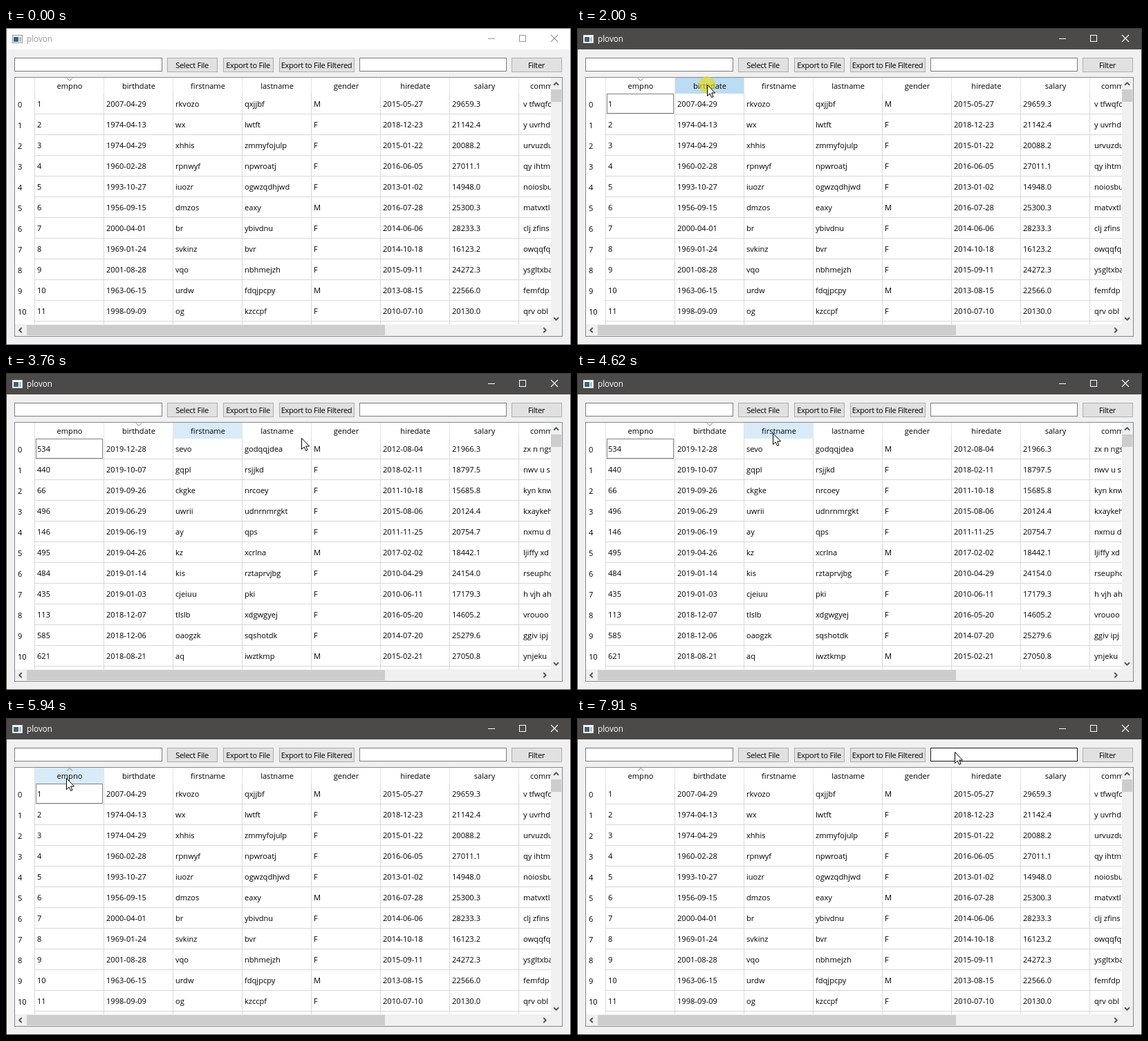
Recreate the animation shown at these times as an HTML page with a canvas. Size 817x459 px, loop 8 s.

```html
<!DOCTYPE html>
<html lang="en">
<head>
<meta charset="utf-8">
<title>Sortable table</title>
<style>
  html, body { margin: 0; width: 100%; height: 100%; overflow: hidden; background: #f0f0f0; }
  canvas { display: block; }
</style>
</head>
<body>
<canvas id="stage" width="817" height="459"></canvas>
<script>
const ctx = document.getElementById('stage').getContext('2d', { alpha: false });
const LOOP = 8000;
const HEADERS = ['empno', 'birthdate', 'firstname', 'lastname', 'gender', 'hiredate', 'salary', 'comment'];

// Seven single-word fields per line; the rest of the line is the comment.
const parse = text => text.trim().split('\n').map(line => {
  const words = line.trim().split(' ');
  return [...words.slice(0, 7), words.slice(7).join(' ')];
});

const byNumber = parse(`
1 2007-04-29 rkvozo qxjjbf M 2015-05-27 29659.3 v tfwqfc
2 1974-04-13 wx lwtft F 2018-12-23 21142.4 y uvrhd
3 1974-04-29 xhhis zmmyfojulp F 2015-01-22 20088.2 urvuzdu
4 1960-02-28 rpnwyf npwroatj F 2016-06-05 27011.1 qy ihtm
5 1993-10-27 iuozr ogwzqdhjwd F 2013-01-02 14948.0 noiosbu
6 1956-09-15 dmzos eaxy M 2016-07-28 25300.3 matvxtl
7 2000-04-01 br ybivdnu F 2014-06-06 28233.3 clj zfins
8 1969-01-24 svkinz bvr F 2014-10-18 16123.2 owqqfq
9 2001-08-28 vqo nbhmejzh F 2015-09-11 24272.3 ysgltxba
10 1963-06-15 urdw fdqjpcpy M 2013-08-15 22566.0 femfdp
11 1998-09-09 og kzccpf F 2010-07-10 20130.0 qrv obl`);

const oldestFirst = parse(`
442 1955-04-13 lqcqcs dhzzr F 2019-05-24 15337.5 trtapqjp
497 1955-06-12 jzzo xatep M 2011-05-02 26341.8 d jrhtwt
154 1955-06-16 gxojo ronhlmi M 2012-09-08 25099.3 z oxcj jk
185 1955-06-20 jdsd tqcnvvd F 2010-03-10 10317.3 ixxrmvz
259 1955-06-29 qhf nlpytogav F 2014-11-22 10862.8 t bxrhzk
140 1955-08-01 qpbuk xhywh M 2015-11-05 15096.9 bwhzhy
102 1955-09-02 lsufj rkyhsy M 2019-11-13 26748.7 irrt ams
267 1955-10-31 fqrmu wlqlb F 2010-11-23 14117.4 tqyyznc
583 1955-11-19 wnda xtqjxfpl F 2011-01-23 19784.3 ivmdbnr
297 1956-01-28 jkozs uubutrvxzc F 2016-09-02 12181.5 lpumrtc
403 1956-04-08 lt vpzhsxbss F 2010-12-13 14075.8 gmpjns`);

const youngestFirst = parse(`
534 2019-12-28 sevo godqqjdea M 2012-08-04 21966.3 zx n ngs
440 2019-10-07 gqpl rsjjkd F 2018-02-11 18797.5 nwv u s
66 2019-09-26 ckgke nrcoey F 2011-10-18 15685.8 kyn knw
496 2019-06-29 uwrii udnrnmrgkt F 2015-08-06 20124.4 kxaykeh
146 2019-06-19 ay qps F 2011-11-25 20754.7 nxmu d
495 2019-04-26 kz xcrlna M 2017-02-02 18442.1 ljiffy xd
484 2019-01-14 kis rztaprvjbg F 2010-04-29 24154.0 rseupho
435 2019-01-03 cjeiuu pki F 2010-06-11 17179.3 h vjh ah
113 2018-12-07 tlslb xdgwgyej F 2016-05-20 14605.2 vrouoo
585 2018-12-06 oaogzk sqshotdk F 2014-07-20 25279.6 ggiv ipj
621 2018-08-21 aq iwztkmp M 2015-02-21 27050.8 ynjeku`);

const firstNamesUp = parse(`
97 1992-02-25 aafvrv sq F 2019-01-20 16741.0 v faq pa
214 1960-06-30 aaie qmftppdytx M 2012-05-20 29180.5 dlyelb b
383 1973-02-21 abbcq ov F 2010-07-25 24051.7 vb zdbw
19 1966-03-14 acsazo amwdlsjis M 2011-04-16 22995.0 t epmh
181 1967-10-12 acsdy uisia M 2017-07-30 10876.9 unij elg
163 1998-08-18 acuzmp vlusapni F 2019-07-09 23347.6 nfohgx
433 1970-02-04 acymmt qxxzxsd M 2019-11-14 13202.0 i gj bcg
547 1963-01-26 adoax qhabo F 2011-03-15 15832.5 trennzg
395 1962-05-08 aftmu anzssulu F 2011-02-18 28120.1 auukyc
456 2018-02-23 afw rcgc M 2015-02-02 11947.7 skxihy p
49 1969-07-29 aggp utk M 2019-05-15 14537.9 rfowto j`);

function makeFirstNamesDown() {
  let seed = 41;
  const int = (low, high) => {
    seed = (seed * 16807) % 2147483647;
    return low + seed % (high - low + 1);
  };
  const word = length => Array.from({ length }, () => String.fromCharCode(int(97, 122))).join('');
  const two = n => String(n).padStart(2, '0');
  const date = (from, to) => `${int(from, to)}-${two(int(1, 12))}-${two(int(1, 28))}`;
  const rows = Array.from({ length: 11 }, () => [
    String(int(12, 630)), date(1956, 2018), 'z' + word(int(1, 5)), word(int(2, 9)),
    'MF'[int(0, 1)], date(2010, 2019), (int(100000, 299999) / 10).toFixed(1), word(8)
  ]);
  return rows.sort((a, b) => (a[2] < b[2] ? 1 : -1));
}

// Timelines: each entry holds from its time until the next one.
const VIEWS = [
  [0, byNumber, 0, false], [2140, oldestFirst, 1, true], [3150, youngestFirst, 1, false],
  [4770, firstNamesUp, 2, true], [5240, makeFirstNamesDown(), 2, false], [5940, byNumber, 0, true]
];
const HOVERS = [
  [0, -1], [820, 1], [1140, 2], [1460, 1], [3310, 2], [4000, -1], [4460, 3], [4600, 2],
  [5630, 1], [5700, 0], [6430, 1], [6586, 2], [6960, -1]
];
const CLICKS = [
  [2000, 2140, true], [3070, 3150, true], [4690, 4770, true], [5170, 5240, true],
  [5860, 5940, true], [6200, 6260, false], [7600, 7680, false]
];
const ACTIVE_AT = 2000, FIELD_HOVER_AT = 7440, FIELD_CLICK_AT = 7600;

// Pointer moves in discrete steps: first step, last step, step count, x, y
const MOVES = [
  [350, 350, 1, 767, 249], [428, 820, 6, 225, 82],
  [1140, 1230, 2, 260, 82], [1290, 1290, 1, 264, 82], [1460, 1520, 2, 188, 82],
  [3230, 3390, 3, 290, 88], [3460, 3760, 5, 427, 94], [3850, 3850, 1, 455, 94],
  [3930, 4160, 4, 507, 94], [4230, 4610, 6, 283, 87],
  [5560, 5780, 4, 87, 87], [6430, 6820, 6, 523, 64], [6960, 7130, 3, 533, 64],
  [7280, 7840, 8, 546, 49]
];

const current = (list, t) => list.filter(entry => entry[0] <= t).pop();

function pointerAt(t) {
  let x = 767, y = 249;
  for (const [start, end, steps, toX, toY] of MOVES) {
    if (t < start) break;
    const gap = (end - start) / Math.max(1, steps - 1);
    const done = t >= end ? 1 : (Math.floor((t - start) / gap) + 1) / steps;
    x += (toX - x) * done;
    y += (toY - y) * done;
  }
  return { x: Math.round(x), y: Math.round(y) };
}

function box(x, y, w, h, fill, stroke) {
  ctx.fillStyle = stroke || fill;
  ctx.fillRect(x, y, w, h);
  if (stroke) {
    ctx.fillStyle = fill;
    ctx.fillRect(x + 1, y + 1, w - 2, h - 2);
  }
}

function text(string, x, y, { align = 'left', color = '#000', size = 11.1, spacing = 0 } = {}) {
  ctx.font = `${size}px "Open Sans", "Noto Sans", sans-serif`;
  ctx.letterSpacing = spacing + 'px';
  ctx.textAlign = align;
  ctx.fillStyle = color;
  ctx.fillText(string, x, y);
}

function line(color, width, ...points) {
  ctx.strokeStyle = color;
  ctx.lineWidth = width;
  ctx.beginPath();
  for (let i = 0; i < points.length; i += 2) ctx.lineTo(points[i], points[i + 1]);
  ctx.stroke();
}

function chevron(x, y, angle, size, color, width) {
  ctx.save();
  ctx.translate(x, y);
  ctx.rotate(angle * Math.PI / 180);
  line(color, width, -size, size / 2, 0, -size / 2, size, size / 2);
  ctx.restore();
}

function drawWindow(active) {
  box(0, 0, 817, 459, '#f0f0f0', active ? '#3b3a38' : '#66646a');
  box(1, 1, 815, 30, active ? '#4c4a48' : '#fff');
  box(9, 10, 15, 12, '#fff', active ? '#d8dde0' : '#8d9499');
  box(11, 13, 7, 7, '#3f6275');
  box(19, 13, 3, 7, '#aebdc5');
  const ink = active ? '#fff' : '#999';
  text('plovon', 30, 20, { color: ink, size: 11.7 });
  box(697, 15, 10, 1, ink);
  ctx.strokeStyle = ink;
  ctx.lineWidth = 1;
  ctx.strokeRect(742.5, 10.5, 9, 9);
  line(ink, 1.1, 788, 10, 798, 20);
  line(ink, 1.1, 798, 10, 788, 20);
}

function drawToolbar(fieldHover) {
  box(12, 43, 214, 20, '#fff', '#7a7a7a');
  box(511, 43, 213, 20, '#fff', fieldHover ? '#171717' : '#7a7a7a');
  const buttons = [[233, 73, 'Select File'], [314, 73, 'Export to File'],
    [395, 109, 'Export to File Filtered'], [731, 73, 'Filter']];
  for (const [x, width, label] of buttons) {
    box(x, 43, width, 21, '#e1e1e1', '#adadad');
    text(label, x + width / 2 - 0.5, 58, { align: 'center', spacing: -0.3 });
  }
}

function drawScrollbars() {
  box(788, 72, 16, 374, '#f0f0f0');
  box(13, 429, 791, 17, '#f0f0f0');
  box(788, 89, 15, 18, '#cdcdcd');
  box(30, 430, 518, 15, '#cdcdcd');
  chevron(795.5, 81, 0, 3.5, '#505050', 1.8);
  chevron(795.5, 421, 180, 3.5, '#505050', 1.8);
  chevron(21, 437.5, -90, 3.5, '#505050', 1.8);
  chevron(779, 437.5, 90, 3.5, '#505050', 1.8);
}

function drawTable([, rows, sortColumn, ascending], hover, pressed, focused) {
  box(12, 71, 793, 376, '#fff', '#828790');
  ctx.save();
  ctx.beginPath();
  ctx.rect(13, 72, 775, 357);
  ctx.clip();
  if (hover >= 0) box(42 + hover * 100, 72, 100, 23, pressed ? '#bcdcf4' : '#d9ebf9');
  HEADERS.forEach((label, column) => {
    const x = 41 + column * 100;
    box(x, 72, 1, 23, '#e5e5e5');
    box(x, 95, 1, 334, '#d8d8d8');
    if (column < 7) text(label, x + 51, 88, { align: 'center' });
    else text(label, 758, 88);
  });
  chevron(92 + sortColumn * 100, 74.5, ascending ? 0 : 180, 4, '#777', 1);
  rows.forEach((row, index) => {
    const baseline = 114 + index * 30;
    box(42, 124 + index * 30, 746, 1, '#d8d8d8');
    text(index, 17, baseline + 1);
    row.forEach((value, column) => text(value, column < 7 ? 45 + column * 100 : 748, baseline));
  });
  if (focused) {
    ctx.setLineDash([1, 1]);
    ctx.strokeStyle = '#000';
    ctx.lineWidth = 1;
    ctx.strokeRect(43.5, 95.5, 96, 28);
    ctx.setLineDash([]);
  }
  ctx.restore();
  drawScrollbars();
}

function drawPointer({ x, y }, clicking) {
  if (clicking) {
    ctx.fillStyle = 'rgba(232, 220, 20, 0.66)';
    ctx.beginPath();
    ctx.arc(x, y, 12, 0, Math.PI * 2);
    ctx.fill();
  }
  ctx.save();
  ctx.translate(x, y);
  const arrow = new Path2D('M.5 .5V16.5L4.2 13 6.6 18.4 9 17.4 6.7 12H11.6Z');
  ctx.fillStyle = '#fff';
  ctx.fill(arrow);
  ctx.strokeStyle = '#000';
  ctx.lineWidth = 1;
  ctx.stroke(arrow);
  ctx.restore();
}

function draw(t) {
  const active = t >= ACTIVE_AT;
  const click = CLICKS.find(([start, end]) => t >= start && t < end);
  drawWindow(active);
  drawToolbar(t >= FIELD_HOVER_AT);
  drawTable(current(VIEWS, t), current(HOVERS, t)[1], click && click[2], active && t < FIELD_CLICK_AT);
  if (t >= MOVES[0][0]) drawPointer(pointerAt(t), click);
}

function tick() {
  draw(performance.now() % LOOP);
  requestAnimationFrame(tick);
}
tick();
</script>
</body>
</html>
```
